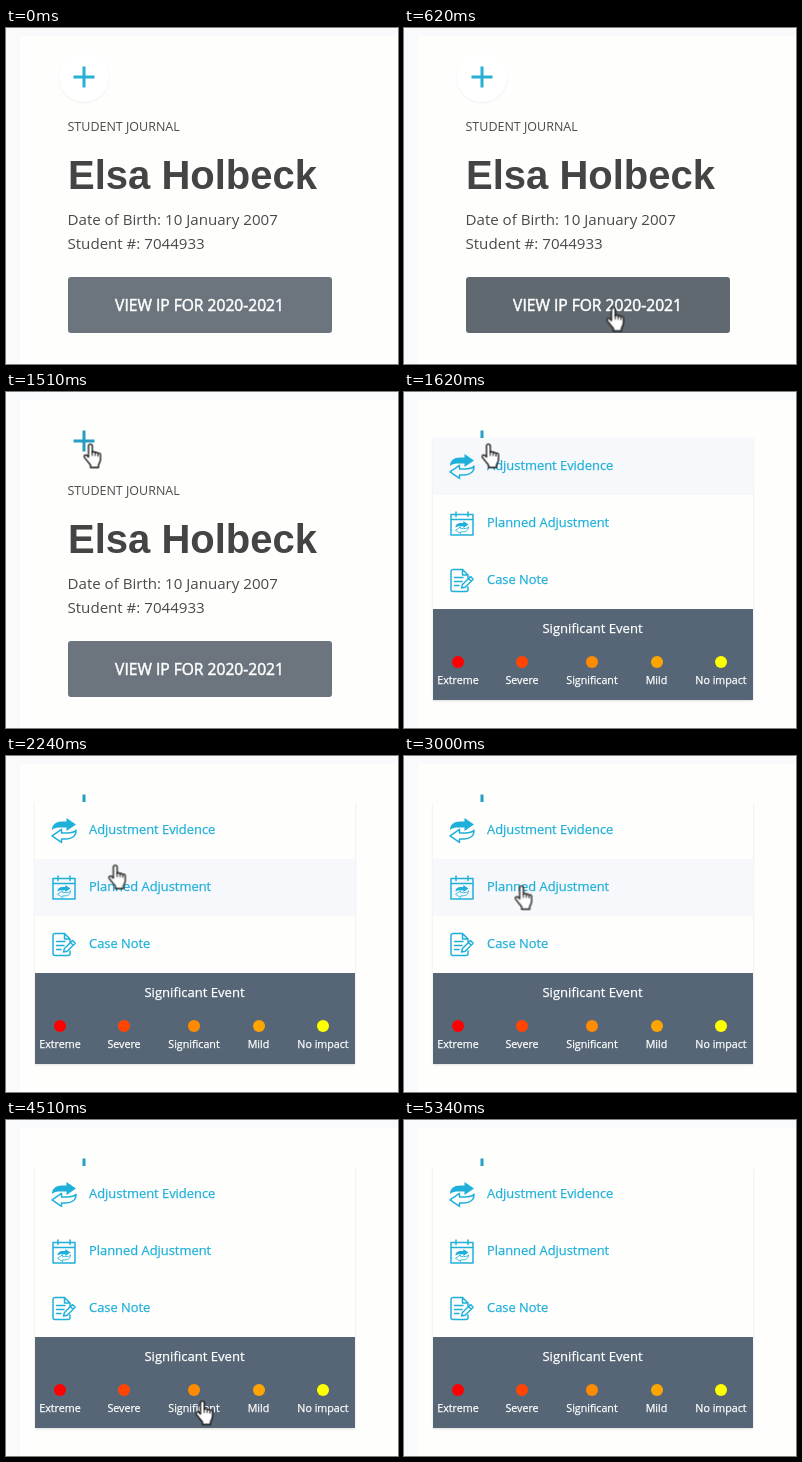
Write an HTML page that moves like this. It is 392 px wide and 336 px high and loops after 5.79 s.

```html
<!DOCTYPE html>
<html lang="en">
<head>
<meta charset="utf-8">
<title>Student journal</title>
<style>
  html, body { margin: 0; width: 100%; height: 100%; overflow: hidden; background: #f9fafc; }
  svg { display: block; }
  text { font-family: "Open Sans", "Noto Sans", sans-serif; }

  .panel { fill: #fefefd; }
  .label { font-size: 12.5px; fill: #4a4a4a; }
  .name { font: bold 40px "Liberation Sans", Arial, sans-serif; fill: #444; }
  .info { font-size: 15.1px; fill: #4a4a4a; }
  .button { fill: #6c757d; }
  .button-text { font-size: 15.6px; fill: #fff; stroke: #fff; stroke-width: .5; text-anchor: middle; }
  .disc { fill: #fff; filter: drop-shadow(0 1px 1px rgba(0, 0, 0, .06)); }
  .plus { fill: none; stroke: #27b0d3; stroke-width: 3; }
  .card { fill: #fefefd; filter: drop-shadow(0 1px 1px rgba(0, 0, 0, .12)); }
  .item { font-size: 12.9px; fill: #1fb0da; stroke: #1fb0da; stroke-width: .25; }
  .line { fill: none; stroke: #1fb0da; stroke-width: 1.5; stroke-linejoin: round; stroke-linecap: round; }
  .solid { fill: #1fb0da; }
  .footer { fill: #566676; }
  .event { font-size: 13.1px; }
  .level { font-size: 10.7px; }
  .event, .level text { fill: #fff; stroke: #fff; stroke-width: .25; text-anchor: middle; }
  .pointer path { fill: #fff; stroke: #111; stroke-linejoin: round; }

  .menu, .row, .pointer, .arrow, .hand, .button, .disc, .plus {
    animation: 5790ms step-end infinite;
  }
  .menu { animation-name: open; }
  .row { animation-name: row; }
  .arrow { animation-name: arrow; }
  .hand { animation-name: hand; }
  .button { animation-name: hover; animation-timing-function: linear; }
  .disc { animation-name: press; }
  .plus { animation-name: plus; }
  .pointer { animation-name: show, move; animation-timing-function: step-end, linear; }

  @keyframes open {
    0% { visibility: hidden; }
    27.97%, 100% { visibility: visible; }
  }
  @keyframes row {
    0% { transform: none; fill: #f7f8fb; opacity: 1; }
    38.4% { transform: translateY(57px); fill: #f7f8fb; }
    53.8% { transform: translateY(114px); fill: #faf9fc; opacity: 1; }
    72.6%, 100% { transform: translateY(114px); fill: #faf9fc; opacity: 0; }
  }
  @keyframes hover {
    0%, 9.46% { fill: #6c757d; }
    11.4%, 11.8% { fill: #5a6268; }
    14.4%, 100% { fill: #6c757d; }
  }
  @keyframes press {
    0% { opacity: 1; }
    26.07%, 100% { opacity: 0; }
  }
  @keyframes plus {
    0% { stroke: #27b0d3; }
    26.07%, 100% { stroke: #249fc4; }
  }
  @keyframes show {
    0% { opacity: 0; }
    8.8% { opacity: 1; }
    92.22%, 100% { opacity: 0; }
  }
  @keyframes arrow {
    0% { opacity: 1; }
    9.46% { opacity: 0; }
    11.8% { opacity: 1; }
    19.4% { opacity: 0; }
    91.5%, 100% { opacity: 1; }
  }
  @keyframes hand {
    0% { opacity: 0; }
    9.46% { opacity: 1; }
    11.8% { opacity: 0; }
    19.4% { opacity: 1; }
    91.5%, 100% { opacity: 0; }
  }
  @keyframes move {
    0%, 8.8% { transform: translate(228px, 316px); }
    10.36% { transform: translate(214px, 290px); }
    12.09% { transform: translate(190px, 240px); }
    13.82% { transform: translate(160px, 180px); }
    15.2% { transform: translate(138px, 140px); }
    16.58% { transform: translate(122px, 111px); }
    18.31% { transform: translate(99px, 71px); animation-timing-function: ease-out; }
    22.62%, 34.49% { transform: translate(84px, 52px); animation-timing-function: ease-in-out; }
    40.93%, 51.24% { transform: translate(117px, 128px); animation-timing-function: ease-in-out; }
    55.96%, 69.03% { transform: translate(123px, 184px); animation-timing-function: ease-in-out; }
    77.89%, 88.72% { transform: translate(196px, 281px); animation-timing-function: ease-in; }
    92.22%, 100% { transform: translate(225px, 320px); }
  }
</style>
</head>
<body>
<svg width="392" height="336" viewBox="0 0 392 336">
  <defs>
    <path id="swap" d="M0 12C0 6.500 4 3.500 10 3.500H14.500V0L24 6.500 14.500 13V9.500H9C5 9.500 2 10 0 12Z"/>
  </defs>

  <rect class="panel" x="14" y="8" width="378" height="328"/>

  <circle class="disc" cx="78" cy="49" r="25"/>
  <path class="plus" d="M78 38.500V59.500M67.500 49H88.500"/>
  <text class="label" x="61.500" y="103">STUDENT JOURNAL</text>
  <text class="name" x="62" y="161">Elsa Holbeck</text>
  <text class="info" x="61.500" y="197">Date of Birth: 10 January 2007</text>
  <text class="info" x="61.500" y="221">Student #: 7044933</text>
  <rect class="button" x="62" y="249" width="264" height="56" rx="3"/>
  <text class="button-text" x="193.500" y="283">VIEW IP FOR 2020-2021</text>

  <g class="menu">
    <rect class="card" x="29" y="46" width="320" height="262"/>
    <rect class="row" x="29" y="46" width="320" height="57"/>

    <g transform="translate(46 62)">
      <use href="#swap" class="solid"/>
      <use href="#swap" class="line" transform="rotate(180 12 12.200)"/>
    </g>
    <text class="item" x="83" y="78">Adjustment Evidence</text>

    <g transform="translate(46 119)">
      <path class="line" d="M1 3.500H23V24H1ZM1 8.500H23M6 1V5.500M18 1V5.500"/>
      <g transform="translate(5.500 10) scale(.54)">
        <use href="#swap" class="solid"/>
        <use href="#swap" class="line" transform="rotate(180 12 11.800)"/>
      </g>
    </g>
    <text class="item" x="83" y="135">Planned Adjustment</text>

    <g transform="translate(46 176)">
      <path class="line" d="M18 19V21.500a2 2 0 0 1-2 2H3a2 2 0 0 1-2-2V3.500a2 2 0 0 1 2-2H12.500L18 7V10M12.500 1.500V7H18M4.500 9.500H13M4.500 13.500H12M4.500 17.500H9"/>
      <path class="line" d="M11.500 20 12.500 16.500 20.500 8.500 23.200 11.200 15.200 19.200ZM18.500 10.500 21.200 13.200"/>
    </g>
    <text class="item" x="83" y="192">Case Note</text>

    <rect class="footer" x="29" y="217" width="320" height="91"/>
    <text class="event" x="188.500" y="241">Significant Event</text>
    <g class="level">
      <circle cx="54" cy="270" r="6" fill="#f00"/><text x="54" y="292">Extreme</text>
      <circle cx="118" cy="270" r="6" fill="#ff4500"/><text x="118" y="292">Severe</text>
      <circle cx="188" cy="270" r="6" fill="#ff8c00"/><text x="188" y="292">Significant</text>
      <circle cx="253" cy="270" r="6" fill="#ffa500"/><text x="252.500" y="292">Mild</text>
      <circle cx="317" cy="270" r="6" fill="#ff0"/><text x="317" y="292">No impact</text>
    </g>
  </g>

  <g class="pointer">
    <path class="arrow" d="M.5 .5V16.500L4.200 13 6.700 18.700 9.200 17.600 6.800 12H11.500Z"/>
    <g class="hand" transform="translate(-6.500 -.5)">
      <path stroke-width="1.300" d="M5 13.500V2.500a1.900 1.900 0 0 1 3.800 0V9c0-1.200 3-1.200 3 .5 0-1.200 2.700-1 2.700 .8 0-1.200 2.500-.8 2.500 1V16c0 2.500-1.600 4-2 5.500V24H7V21.500C5 19 3 16.500 .9 13.800c-1-1.700 .9-3.200 2.300-2Z"/>
      <path d="M8.800 8V12.500M11.800 9.500V12.500M14.500 10.500V13"/>
    </g>
  </g>
</svg>
</body>
</html>
```
